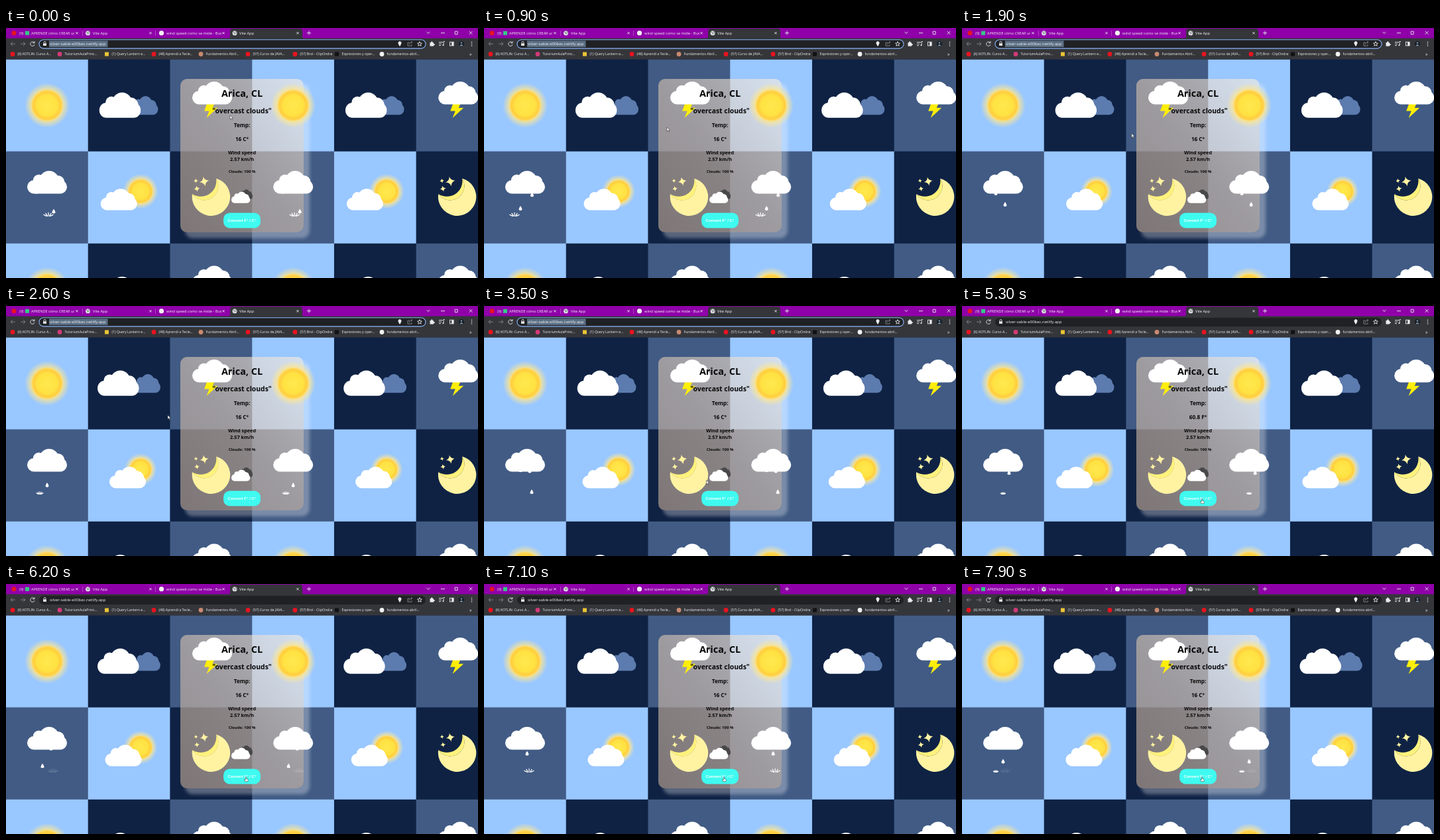
Recreate the animation shown at these times as an HTML page. Size 712x378 px, loop 8000 ms.

```html
<!DOCTYPE html>
<html lang="es">
<head>
<meta charset="utf-8">
<title>Vite App</title>
<style>
html, body { margin: 0; width: 100%; height: 100%; overflow: hidden; background: #0f2244; }
svg { display: block; width: 712px; height: 378px; font-family: "Open Sans", "Noto Sans", sans-serif; }
.line { fill: none; stroke: #e8eaed; stroke-width: .9; }
.card text { text-anchor: middle; font-weight: 700; fill: #080808; }
</style>
</head>
<body>
<svg viewBox="0 0 712 378">
  <defs>
    <radialGradient id="sunFill">
      <stop offset="0" stop-color="#ffe84e"/>
      <stop offset=".45" stop-color="#ffe242"/>
      <stop offset=".6" stop-color="#ffcd40"/>
      <stop offset=".66" stop-color="#ffd85a"/>
      <stop offset=".72" stop-color="#ffe68a" stop-opacity=".75"/>
      <stop offset="1" stop-color="#ffeb9c" stop-opacity="0"/>
    </radialGradient>
    <linearGradient id="glass" x1="1" y1="0" x2="0" y2="1">
      <stop offset="0" stop-color="#faf0e2" stop-opacity=".62"/>
      <stop offset=".5" stop-color="#dcc6b2" stop-opacity=".6"/>
      <stop offset="1" stop-color="#c8ae98" stop-opacity=".6"/>
    </linearGradient>
    <filter id="soft" x="-20%" y="-20%" width="140%" height="140%"><feGaussianBlur stdDeviation="2.5"/></filter>
    <mask id="outsideCard">
      <rect width="712" height="378" fill="#fff"/>
      <rect x="263" y="77" width="186" height="232" rx="10" fill="#000"/>
    </mask>
    <g id="cloud">
      <rect y="14" width="60" height="20.5" rx="10.2"/>
      <circle cx="33" cy="14.7" r="14.7"/><circle cx="17.5" cy="14" r="8.6"/><circle cx="46" cy="17.5" r="10.5"/>
    </g>
    <path id="star" d="M0-7Q1-1 7 0Q1 1 0 7Q-1 1-7 0Q-1-1 0-7Z"/>
  </defs>

  <g id="cells"></g>
  <use href="#cells" x="371.2"/>
  <use href="#cells" y="278.4"/>
  <use href="#cells" x="371.2" y="278.4"/>

  <rect x="270" y="84" width="188" height="234" rx="12" fill="#fff" opacity=".3" filter="url(#soft)" mask="url(#outsideCard)"/>
  <rect x="263" y="77" width="186" height="232" rx="10" fill="url(#glass)"/>

  <g id="icons">
    <circle id="sun" cx="62" cy="117" fill="url(#sunFill)"/>
    <use id="backCloud" href="#cloud" fill="#5c7bae"/>
    <use id="frontCloud" href="#cloud" fill="#fff"/>
    <path d="M304 112L299 125.5H306.5L302.5 136L319 120.8H311.5L315.5 112Z" fill="#ffee08"/>
    <use href="#cloud" x="281" y="81" fill="#fff"/>
    <g id="rain" fill="#fff"></g>
    <use href="#cloud" x="32" y="216" fill="#fff"/>
    <circle id="smallSun" cx="203" cy="247" fill="url(#sunFill)"/>
    <use id="slidingCloud" href="#cloud" fill="#fff"/>
    <path d="M317 227.5A28.7 28.7 0 1 1 281 251A21.5 21.5 0 0 0 317 227.5Z" fill="#fff3a2"/>
    <path d="M317 227.5A23.5 23.5 0 0 1 281 251A21.5 21.5 0 0 0 317 227.5Z" fill="#fff27c"/>
    <g id="stars" fill="#fff3a2"></g>
  </g>
  <use href="#icons" x="371.2"/>
  <use href="#icons" y="278.4"/>
  <use href="#icons" x="371.2" y="278.4"/>

  <g class="card">
    <text x="356" y="103.5" font-size="14.4">Arica, CL</text>
    <text x="356" y="129" font-size="10.4">"overcast clouds"</text>
    <text x="356" y="150" font-size="8.2">Temp:</text>
    <text x="356" y="170.5" font-size="8.2" id="temperature"></text>
    <text x="356" y="190.5" font-size="7.3">Wind speed</text>
    <text x="356" y="200.5" font-size="7.3">2.57 km/h</text>
    <text x="356" y="219.3" font-size="6">Clouds: 100 %</text>
    <use href="#cloud" transform="translate(351 244)scale(.35 .43)" fill="#48484a"/>
    <use href="#cloud" transform="translate(340 247.5)scale(.47 .5)" fill="#fff"/>
    <rect x="328" y="279.5" width="56" height="23" rx="9.5" fill="#3ffaf0"/>
    <text x="356" y="293" font-size="6.1" style="fill:#fff;font-family:'Liberation Sans',Arial,sans-serif">Convert F° / C°</text>
  </g>

  <g id="browser">
    <rect width="712" height="16" fill="#8f00a9"/>
    <path d="M335 16Q338 16 338 12V5Q338 1 342 1H443Q447 1 447 5V12Q447 16 450 16Z" fill="#35363a"/>
    <rect y="15.5" width="712" height="32" fill="#35363a"/>
    <path d="M115.5 4V12M225.5 4V12" stroke="#bd63cc" stroke-width=".7"/>
    <rect x="50" y="17.7" width="583" height="13.2" rx="6.6" fill="#202124"/>
    <g id="focus">
      <rect x="50" y="17.7" width="583" height="13.2" rx="6.6" fill="none" stroke="#8ab4f8" stroke-width="1.1"/>
      <rect x="65" y="19.3" width="88.5" height="9.6" fill="#5c7085"/>
    </g>
    <g id="labels" fill="#f4f5f7"></g>
    <g class="line">
      <path d="M14 24H7M10 21L7 24L10 27M22 24H29M26 21L29 24L26 27" stroke="#85888c"/>
      <path d="M42.4 22A3.2 3.2 0 1 0 43 25M43 20V22.7H40.3"/>
      <path d="M57 23.5V21.8A1.4 1.4 0 0 1 60 21.8V23.5"/>
      <path d="M609 22H606V27H612V25M608 25Q609 22 613 21.5M611 20L613 21.5L611 23" stroke="#85888c"/>
      <path d="M624 20.5L625 23H627.4L625.5 24.7L626.2 27.2L624 25.7L621.8 27.2L622.5 24.7L620.6 23H623Z"/>
      <path d="M653 21.5H659M653 24H657M653 26.5H656M660 26V20.5H662"/>
      <rect x="669.5" y="21.2" width="5.6" height="5.6"/>
      <path d="M634.5 6L637 8.3L639.5 6M656 7.5H662M677.2 5.2H681.2V9.4H677.2ZM698.8 5L703.4 9.6M703.4 5L698.8 9.6M457 4.5V10.5M454 7.5H460"/>
      <path id="tabClosers"/>
    </g>
    <g fill="#e8eaed">
      <rect x="56" y="23.2" width="5" height="3.6" rx=".6"/>
      <path d="M594 28Q590 22 592.2 21A2.4 2.4 0 0 1 595.8 21Q598 22 594 28Z"/>
      <path d="M639.5 22H641.2A1.2 1.2 0 1 1 643.4 22H645V24A1.2 1.2 0 1 1 645 26V27.5H639.5Z"/>
      <circle cx="659.5" cy="26" r="1.1"/><rect x="672.2" y="21.2" width="3" height="5.6"/>
      <circle cx="702.5" cy="21.2" r=".8"/><circle cx="702.5" cy="24" r=".8"/><circle cx="702.5" cy="26.8" r=".8"/>
    </g>
    <circle cx="687" cy="24" r="4.2" fill="#17212b"/>
    <path d="M684.5 27.3Q687 22 689.5 27.3Z" fill="#8794a3"/><circle cx="687" cy="22.5" r="1.2" fill="#8794a3"/>
  </g>

  <path id="arrow" d="M0 0V6L1.5 4.8L2.5 7L3.5 6.6L2.5 4.4H4.4Z" fill="#fff" stroke="#222" stroke-width=".5"/>
  <path id="hand" d="M-.7 0Q0-.8 .7 0V2.5L3 3.3Q3.7 4 2.8 6.7H-1.2L-2.7 4Q-2.2 3.2-.7 4.3Z" fill="#fff" stroke="#222" stroke-width=".5"/>
</svg>
<script>
const $ = id => document.getElementById(id);
const LOOP = 8000, TOP = 47.4, CELL_W = 371.2 / 3, CELL_H = 139.2;
const CLICKS = [4.7, 6.2];

const sky = { light: '#99c7ff', mid: '#415b84', navy: '#0f2244' };
$('cells').innerHTML = ['light', 'navy', 'mid', 'mid', 'light', 'navy'].map((name, i) =>
  `<rect x="${i % 3 * CELL_W}" y="${TOP + Math.floor(i / 3) * CELL_H}" width="${CELL_W + .3}" height="${CELL_H + .3}" fill="${sky[name]}"/>`).join('');

const label = (x, y, size, text) => `<text x="${x}" y="${y}" font-size="${size}">${text}</text>`;
const dot = (x, y, color, r = 3.4) => `<circle cx="${x}" cy="${y}" r="${r}" fill="${color}"/>`;
const square = (x, y, color) => `<rect x="${x - 3}" y="${y - 3}" width="6" height="6" fill="${color}"/>`;
const globe = x => dot(x, 7.7, '#dfe1e5', 3.5) +
  `<path d="M${x - 2.5} 6L${x} 7L${x - .5} 9.5M${x + 1} 5L${x + 2.5} 7.5L${x + 1} 9" fill="none" stroke="#666a70" stroke-width=".9"/>`;

const bookmarks = [
  [10, '#e8131f', '(6) KOTLIN: Curso A...'],
  [81, '#d23a78', 'TutoriumAulaPrinc...'],
  [152, '#e9c437', '(1) Query Lantern e...'],
  [223, '#e8131f', '(48) Aprendí a Tecle...'],
  [294, '#c98a72', 'Fundamentos Abril...'],
  [365, '#e8131f', '(57) Curso de JAVA...'],
  [436, '#e8131f', '(57) Brol - ClipOndra'],
  [499, '#111111', 'Expresiones y oper...'],
  [567, '#f1f1f1', 'fundamentos-abril...']
];
$('labels').innerHTML =
  dot(12, 7.7, '#e8131f') + label(20, 9.8, 5.5, '(9)') + square(32, 7.7, '#35c987') +
  `<svg x="0" y="0" width="103" height="16">${label(38, 9.8, 5.5, 'APRENDE cómo CREAR una')}</svg>` +
  globe(123.5) + label(131, 9.8, 5.7, 'Vite App') +
  dot(234.5, 7.7, '#f1f1f1', 3.6) +
  `<svg x="0" y="0" width="325" height="16">${label(242, 9.8, 5.7, 'wind speed como se mide - Buscar')}</svg>` +
  globe(345) + label(352, 9.8, 5.7, 'Vite App') +
  label(66, 26.2, 6, 'silver-sable-e00bec.netlify.app') +
  bookmarks.map(([x, color, text], i) =>
    (i === 2 || i === 7 ? square : dot)(x, 39.5, color) + label(x + 7.5, 41.3, 5.2, text)).join('') +
  label(699, 41.5, 7, '»');
$('tabClosers').setAttribute('d', [107, 218, 328, 440].map(x =>
  `M${x - 1.7} 6L${x + 1.7} 9.4M${x + 1.7} 6L${x - 1.7} 9.4`).join(''));

// Each drop: start in seconds, x
const FALL = .9;
const drops = [
  [-1.1, 64], [-.83, 72], [-.2, 46], [.13, 55], [.53, 72.5], [1.22, 65], [1.6, 51], [1.86, 62],
  [2.62, 72], [3.22, 69], [3.28, 55], [3.85, 65], [4.35, 62], [4.93, 71], [5.4, 55],
  [5.95, 68], [6.62, 65], [6.95, 51], [7.2, 62]
];
const dropPath = (x, y) => `<path d="M${x} ${y - 4}Q${x + 5} ${y + 3} ${x} ${y + 3}Q${x - 5} ${y + 3} ${x} ${y - 4}Z"/>`;
const splash = (x, age) => {
  const k = Math.min(1, .3 + age * 4);
  const rays = [-7, -4, 0, 4, 7].map((dx, i) =>
    `M${x + dx * .4 * k} 284.3L${x + dx * k} ${284.3 - [2, 4, 5, 4, 2][i] * k}`).join('');
  return `<path d="${rays}" stroke="#fff" stroke-width="1.3" stroke-linecap="round" opacity="${Math.min(1, (.4 - age) * 6)}"/>`;
};
const drawRain = t => drops.map(([start, x]) => {
  const age = t - start;
  if (age < 0 || age > FALL + .4) return '';
  return age < FALL ? dropPath(x, 246 + 37 * (age / FALL) ** 2) : splash(x, age - FALL);
}).join('');

const ease = u => u * u * (3 - 2 * u);
const path = [[0, 338, 132], [.9, 276, 150], [2.6, 244, 165], [3.9, 362, 292], [8, 362, 292]];
const pointer = t => {
  const i = Math.max(1, path.findIndex(p => p[0] >= t));
  const [t0, x0, y0] = path[i - 1], [t1, x1, y1] = path[i];
  const u = ease((t - t0) / (t1 - t0));
  return [x0 + (x1 - x0) * u, y0 + (y1 - y0) * u];
};
const place = (id, x, y, sx = 1, sy = sx) =>
  $(id).setAttribute('transform', `translate(${x} ${y})scale(${sx} ${sy})`);
const show = (id, visible) => { $(id).style.display = visible ? '' : 'none'; };
const wave = (t, period) => Math.cos(t / period * 2 * Math.PI);

function draw(t) {
  const drift = 1.4 + 1.4 * wave(t, 1.8);
  const slide = wave(t - 4.8, 5.4);
  place('backCloud', 191 - drift * 1.3, 103, .7, .82);
  place('frontCloud', 138 + drift, 97.5, 1.04, 1.11);
  place('slidingCloud', 149 - 8.3 * slide, 243, .92, .94);
  $('sun').setAttribute('r', 34);
  $('smallSun').setAttribute('r', 25.5 + 1.5 * slide);
  $('rain').innerHTML = drawRain(t);
  const twinkle = 1 + .06 * wave(t, 1.8);
  $('stars').innerHTML = [[299, 232, 1], [286.5, 231, .45], [288, 243, .62]].map(([x, y, s]) =>
    `<use href="#star" transform="translate(${x} ${y})rotate(-12)scale(${s * twinkle})"/>`).join('');

  const fahrenheit = t >= CLICKS[0] && t < CLICKS[1];
  $('temperature').textContent = fahrenheit ? '60.8 F°' : '16 C°';
  show('focus', t < CLICKS[0]);

  const [x, y] = pointer(t);
  const overButton = x > 328 && y > 279;
  place('arrow', x, y);
  place('hand', x, y);
  show('arrow', !overButton);
  show('hand', overButton);
}

const began = performance.now();
function tick() {
  const elapsed = (performance.now() - began) % LOOP;
  draw(Math.floor(elapsed / 100) / 10);
  requestAnimationFrame(tick);
}
tick();
</script>
</body>
</html>
```
